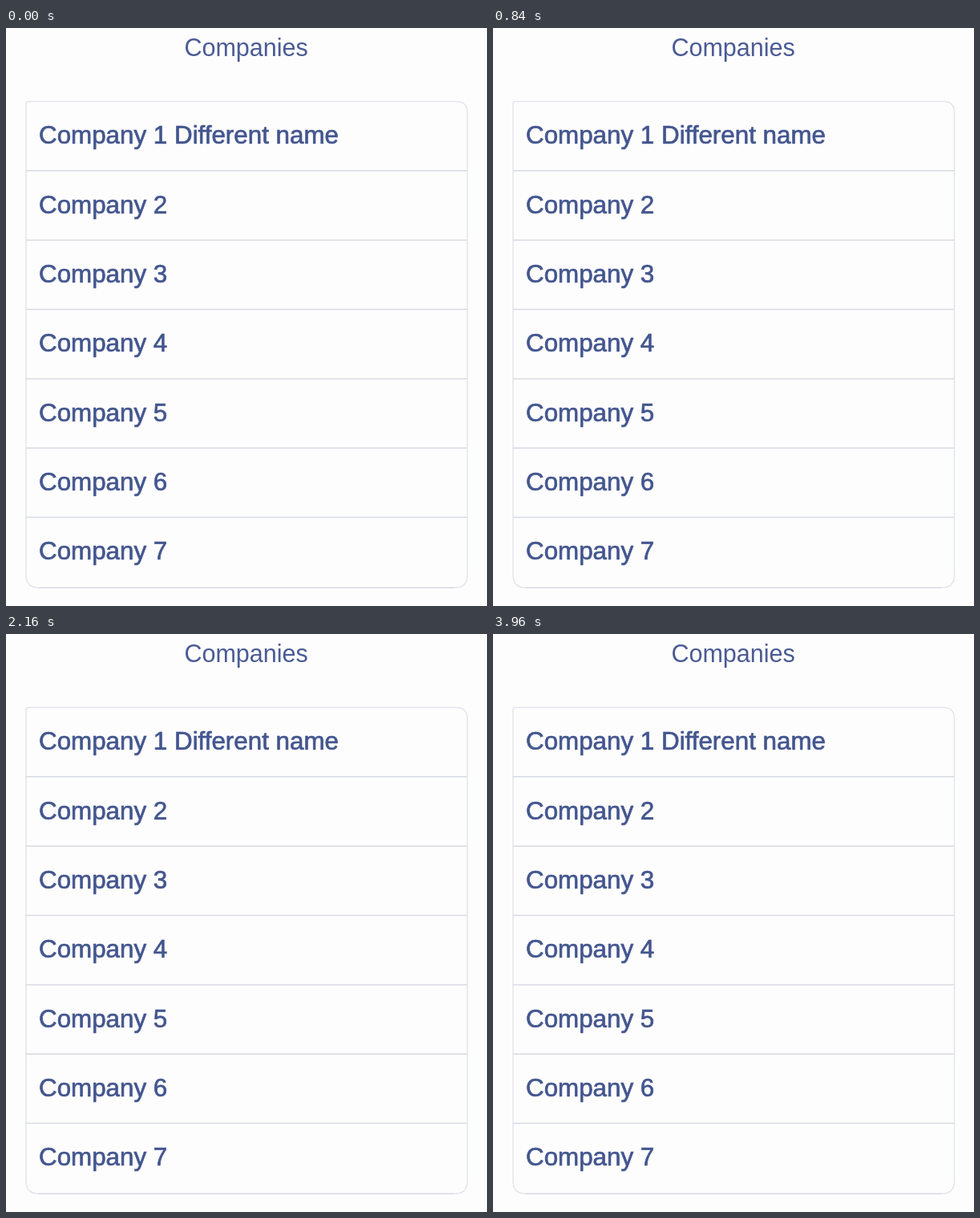
Recreate the animation shown at these times as an HTML page. Size 600 px wide and 720 px high, loop 4000 ms.

```html
<!DOCTYPE html>
<html lang="en">
<head>
<meta charset="utf-8">
<title>Companies</title>
<style>
  html, body { margin: 0; width: 100%; height: 100%; overflow: hidden; background: #fefdfe; }
  svg { display: block; width: 600px; height: 720px; overflow: hidden; }
  text { font-family: "Liberation Sans", Arial, sans-serif; fill: #43568e; }
  .title { font-size: 30.5px; text-anchor: middle; fill: #4a5b94; }
  .name { font-size: 31.35px; stroke: #43568e; stroke-width: .7px; }
  path { fill: none; stroke-width: 1.5px; }
  .side { stroke: #e4e5ec; }
  .line { stroke: #d8dae2; }

  /* 0 = at rest, 1 = fully replaced by the incoming copy */
  @property --shift { syntax: "<number>"; inherits: true; initial-value: 0; }
  .reload { animation: 4s ease-in-out infinite; }
  .thrice { animation-name: thrice; }
  .twice { animation-name: twice; }
  .leave {
    transform: translateX(calc(var(--shift) * 600px));
    opacity: calc(1 - var(--shift));
    filter: saturate(calc(1 - var(--shift)));
  }
  .enter {
    transform: translateX(calc((var(--shift) - 1) * 600px));
    opacity: var(--shift);
    filter: saturate(var(--shift));
  }
  @keyframes thrice {
    0%, 9.35%, 16.851%, 26.125%, 33.626%, 79.25%, 86.751%, 100% { --shift: 0; }
    16.85%, 33.625%, 86.75% { --shift: 1; }
  }
  @keyframes twice {
    0%, 9.35%, 16.851%, 79.25%, 86.751%, 100% { --shift: 0; }
    16.85%, 86.75% { --shift: 1; }
  }
</style>
</head>
<body>
<svg viewBox="0 0 600 720">
  <text class="title" x="299.6" y="35">Companies</text>
  <g id="list"></g>
</svg>
<script>
  const LEFT = 25, RIGHT = 575.5, TOP = 91.5, PITCH = 86.35, BOTTOM = 697.3, COUNT = 7;
  const reloads = { 2: 'thrice', 6: 'twice', 7: 'thrice' };

  function borders(n, top, bottom) {
    if (n === 1) return `
      <path class="side" d="M${LEFT} ${bottom}V${top + 3}q0-3 3-3H${RIGHT - 14}q14 0 14 14V${bottom}"/>
      <path class="line" d="M${LEFT - .5} ${bottom}H${RIGHT + .5}"/>`;
    if (n === COUNT) return `
      <path class="side" d="M${LEFT} ${top}V${bottom - 16}q0 16 16 16M${RIGHT} ${top}V${bottom - 16}q0 16-16 16"/>
      <path class="line" d="M${LEFT + 16} ${bottom}H${RIGHT - 16}"/>`;
    return `
      <path class="side" d="M${LEFT} ${top}V${bottom}M${RIGHT} ${top}V${bottom}"/>
      <path class="line" d="M${LEFT - .5} ${bottom}H${RIGHT + .5}"/>`;
  }

  function row(n) {
    const top = TOP + (n - 1) * PITCH;
    const bottom = n === COUNT ? BOTTOM : top + PITCH;
    const name = `Company ${n}` + (n === 1 ? ' Different name' : '');
    const cell = borders(n, top, bottom) +
      `<text class="name" x="41" y="${top + 52.7}">${name}</text>`;
    if (!reloads[n]) return cell;
    return `<g class="reload ${reloads[n]}"><g class="leave">${cell}</g><g class="enter">${cell}</g></g>`;
  }

  document.getElementById('list').innerHTML =
    Array.from({ length: COUNT }, (_, i) => row(i + 1)).join('');
</script>
</body>
</html>
```
